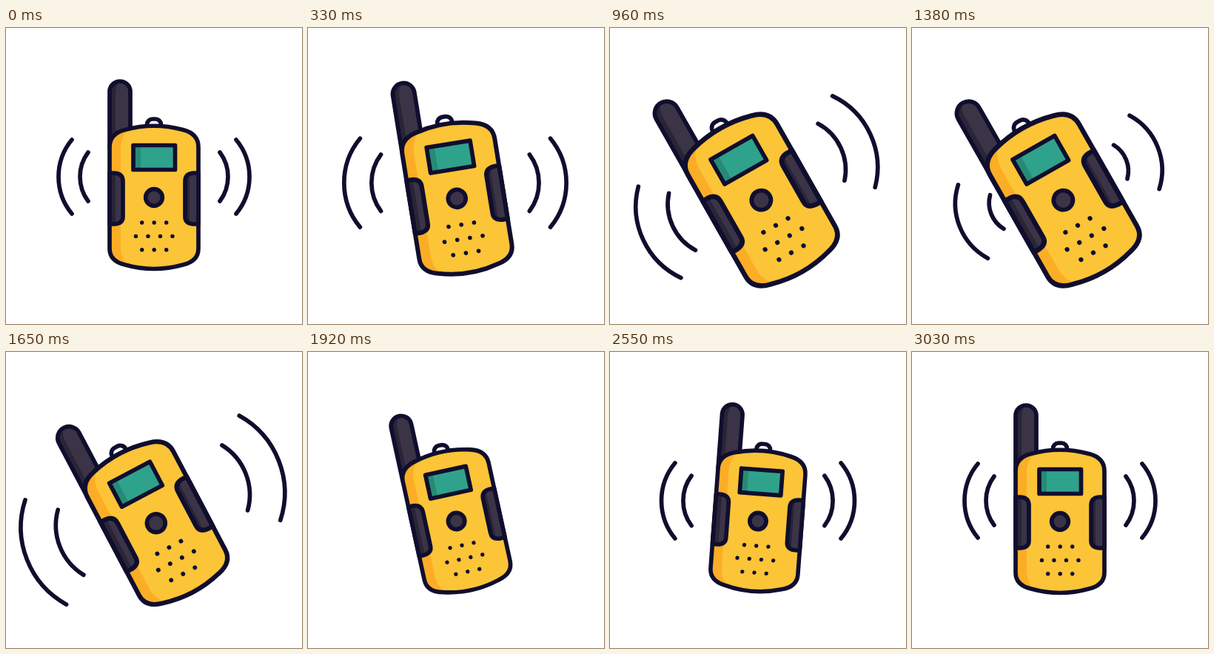
An HTML page that plays this animation: 400 by 400 pixels, repeating every 5060 ms.

```html
<!DOCTYPE html>
<html lang="en">
<head>
<meta charset="utf-8">
<title>Walkie-talkie</title>
<style>
  html, body { margin: 0; width: 100%; height: 100%; overflow: hidden; background: #fff; }
  svg { display: block; width: 100vw; height: 100vh; }
  .line { fill: none; stroke: #100e2e; stroke-width: 5.7; stroke-linecap: round; stroke-linejoin: round; vector-effect: non-scaling-stroke; }
  .dark { fill: #3b3446; }
  .shade { fill: #2a2437; }
</style>
</head>
<body>
<svg viewBox="0 0 400 400">
  <defs>
    <path id="case" d="M140 161C140 149 147 141 161 137.500Q200 127 239 137.500C253 141 260 149 260 161V298C260 310 252 317 239 320Q200 331 161 320C148 317 140 310 140 298Z"/>
    <path id="grip" d="M140 196H147Q158 197 158 207V255Q158 264 147 265H140Z"/>
    <clipPath id="inCase"><use href="#case"/></clipPath>
  </defs>
  <g id="scene">
    <g id="waves">
      <path id="inner" class="line"/>
      <path id="outer" class="line"/>
    </g>
    <g id="radio">
      <path class="dark" d="M140 160V86a14 14 0 0 1 28 0V150Z"/>
      <path class="shade" d="M140 160V86Q141 73 154 72Q148 77 148 88V150Z"/>
      <path class="line" d="M140 160V86a14 14 0 0 1 28 0V136"/>
      <path class="line" d="M190.500 132V130.500a7.500 7.500 0 0 1 7.500 -7.500h4a7.500 7.500 0 0 1 7.500 7.500V132"/>
      <use href="#case" fill="#fcc437"/>
      <path clip-path="url(#inCase)" fill="#fcad26" d="M140 130H174Q155 142 155 162V299Q156 315 172 328H140Z"/>
      <use href="#case" class="line"/>
      <use href="#grip" class="dark"/>
      <path class="shade" d="M140 196H148V265H140Z"/>
      <use href="#grip" class="line"/>
      <use href="#grip" class="dark" transform="matrix(-1 0 0 1 400 0)"/>
      <path class="shade" d="M242 206Q244 198 248 197V264Q244 263 242 256Z"/>
      <use href="#grip" class="line" transform="matrix(-1 0 0 1 400 0)"/>
      <path fill="#2fa28b" d="M172 158.500h56.500v33h-56.500z"/>
      <path fill="#278a76" d="M172 158.500h10v33h-10z"/>
      <path class="line" d="M172 158.500h56.500v33h-56.500z"/>
      <circle class="dark" cx="200" cy="229" r="11.300"/>
      <circle class="line" cx="200" cy="229" r="11.300"/>
      <g id="speaker" fill="#100e2e"></g>
    </g>
  </g>
</svg>
<script>
const LOOP = 5060, STEP = 30, END = 3030;
const el = id => document.getElementById(id);

// Eased 0 to 1 between two times.
function ramp(t, from, to) {
  const u = Math.min(1, Math.max(0, (t - from) / (to - from)));
  return u * u * (3 - 2 * u);
}

// Swell, vanish, swell again, vanish, then return with a small overshoot.
const pulse = (t, peak, lag) => 1
  + (peak - 1) * ramp(t, lag, 880) - peak * ramp(t, 880, 1180)
  + peak * ramp(t, 1170 + lag, 1520 + lag) - peak * ramp(t, 1620, 1900)
  + 1.07 * ramp(t, 1970 + lag, 2290 + lag) - 0.07 * ramp(t, 2370, 2730);

function drawArc(id, dist, half, radius, s) {
  const x = dist * (1 + (s - 1) * (s > 1 ? 0.72 : 0.35));
  const h = half * s, r = radius * s;
  el(id).setAttribute("d", s < 0.08 ? "" :
    `M${-x} ${-h}A${r} ${r} 0 0 0 ${-x} ${h}M${x} ${-h}A${r} ${r} 0 0 1 ${x} ${h}`);
}

function render(t) {
  const size = 1 + 0.155 * ramp(t, 0, 820) - 0.225 * ramp(t, 1380, 2190) + 0.07 * ramp(t, 2190, 2700);
  const tilt = -29.6 * ramp(t, 0, 890) + 37 * ramp(t, 1545, 2330) - 7.4 * ramp(t, 2330, 2820);
  const waveTilt = -25 * ramp(t, 330, 950) + 3 * ramp(t, 960, 1380) + 22 * ramp(t, 1620, 1950);
  const drift = ramp(t, 0, 540) - ramp(t, 1620, 1950);
  const lean = ramp(t, 0, 890) - ramp(t, 1380, 2100);

  el("scene").setAttribute("transform", `translate(200 198) scale(${size}) translate(-200 -198)`);
  el("radio").setAttribute("transform", `translate(${3.8 * lean} ${-lean}) rotate(${tilt} 200 229)`);
  el("waves").setAttribute("transform", `translate(${200 - 1.5 * drift} ${201 + 11.5 * drift}) rotate(${waveTilt})`);
  drawArc("inner", 89, 33, 55, pulse(t, 1.35, 40));
  drawArc("outer", 111, 50, 78.4, pulse(t, 1.43, 0));
}

for (let row = 0; row < 3; row++) {
  const count = 3 + row % 2;
  for (let i = 0; i < count; i++) {
    const x = 200.2 + (i - (count - 1) / 2) * 16.5, y = 263 + row * 18.4;
    el("speaker").insertAdjacentHTML("beforeend", `<circle cx="${x}" cy="${y}" r="2.7"/>`);
  }
}

const start = performance.now();
function tick() {
  const t = (performance.now() - start) % LOOP;
  render(Math.min(END, Math.floor(t / STEP) * STEP));
  requestAnimationFrame(tick);
}
tick();
</script>
</body>
</html>
```
